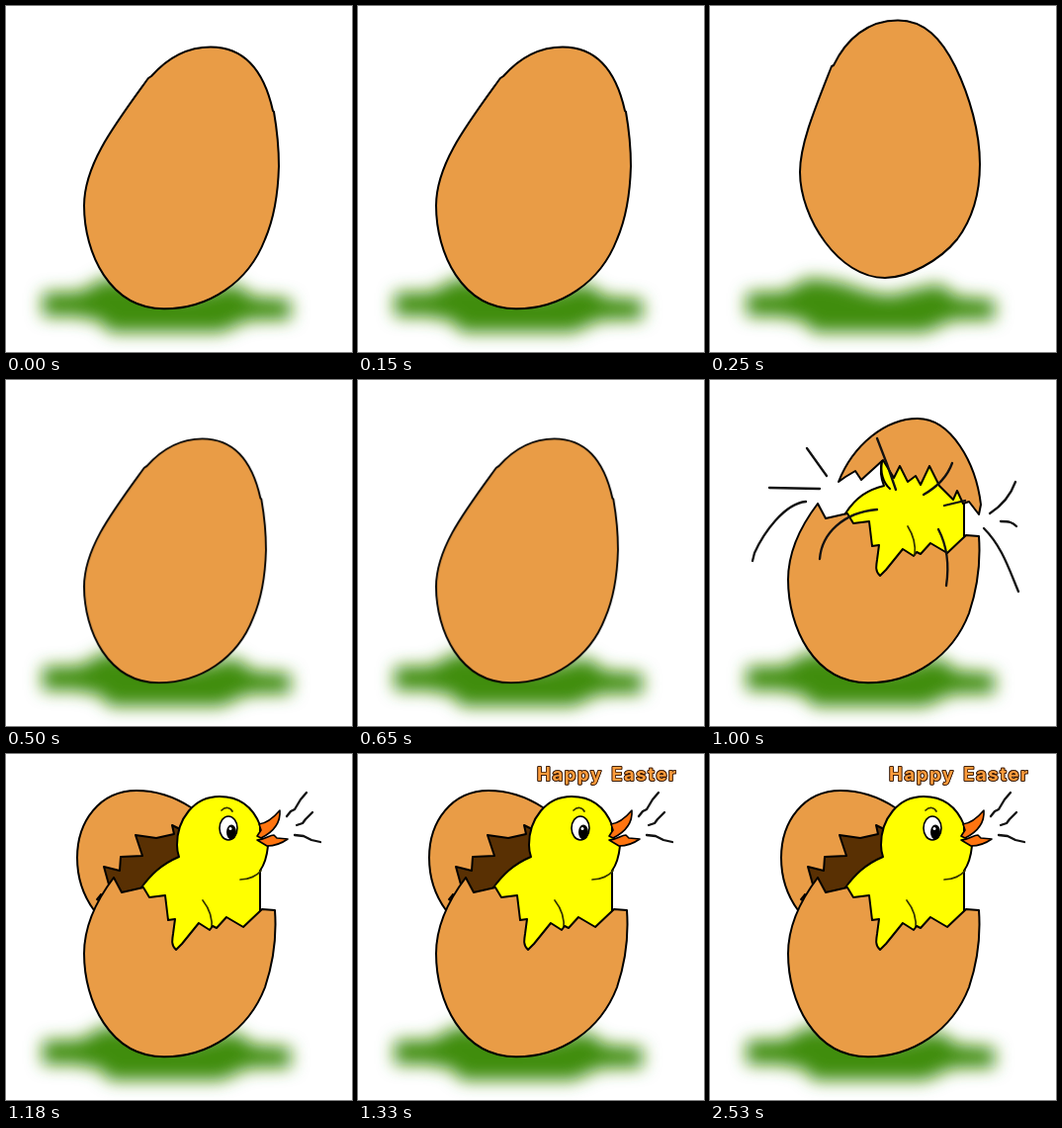
Write an HTML page without scripts that moves like this. It is 350 px wide and 350 px high and loops after 3330 ms.

```html
<!DOCTYPE html>
<html lang="en">
<head>
<meta charset="utf-8">
<title>Happy Easter</title>
<style>
  html, body { margin: 0; width: 100%; height: 100%; overflow: hidden; background: #fff; }
  svg { display: block; width: 100vw; height: 100vh; }

  .line, .shell, .chick, .beak, .inside {
    stroke: #000; stroke-width: 2; stroke-linecap: round; stroke-linejoin: round;
    vector-effect: non-scaling-stroke;
  }
  .line { fill: none; }
  .shell { fill: #e99c46; }
  .chick { fill: #ff0; }
  .beak { fill: #ff7410; stroke-width: 1.6; }
  .inside { fill: #593003; }
  .soft { stroke: #111; stroke-width: 2.3; }
  .thin { stroke: #333300; stroke-width: 1.7; }

  .title {
    font: 700 18.5px Inter, "Open Sans", sans-serif;
    letter-spacing: 1.6px; word-spacing: 2.5px;
    fill: #ff9c3c; stroke: #3a1800; stroke-width: 1.6; stroke-linejoin: round;
    paint-order: stroke; filter: drop-shadow(.8px .8px 0 #200c00);
  }

  /* Each layer switches on and off without fading. */
  .layer { opacity: 0; animation: 3330ms step-end infinite; }
  .rest { animation-name: rest; }
  .jump { animation-name: jump; }
  .squash { animation-name: squash; }
  .cracked { animation-name: cracked; }
  .burst { animation-name: burst; }
  .hatched { animation-name: hatched; }
  .greeting { animation-name: greeting; }

  @keyframes rest { 0%, 22.5225% { opacity: 1 } 7.5075%, 30.03%, 100% { opacity: 0 } }
  @keyframes jump { 0%, 15.015%, 100% { opacity: 0 } 7.5075% { opacity: 1 } }
  @keyframes squash { 0%, 22.5225%, 100% { opacity: 0 } 15.015% { opacity: 1 } }
  @keyframes cracked { 0% { opacity: 0 } 22.5225%, 100% { opacity: 1 } }
  @keyframes burst { 0%, 35.4354%, 100% { opacity: 0 } 30.03% { opacity: 1 } }
  @keyframes hatched { 0% { opacity: 0 } 35.4354%, 100% { opacity: 1 } }
  @keyframes greeting { 0% { opacity: 0 } 39.9399%, 100% { opacity: 1 } }
</style>
</head>
<body>
<svg viewBox="0 0 350 350">
  <defs>
    <filter id="blur" x="-20%" y="-80%" width="140%" height="260%">
      <feGaussianBlur stdDeviation="8.5"/>
    </filter>
    <path id="egg" d="M147 71C163 53 183 41.500 207 41.500C245 41.500 262 70 270 106L271 107
      C275 130 276 150 276 162C275 200 268 222 262 236C245 280 205 306.300 160 306.300
      C105 306.300 79 250 79 202C79 160 110 120 144 73Z"/>
  </defs>

  <path filter="url(#blur)" fill="#3f8d08" d="M37 290L75 289L100 275L130 279L160 289L182 293
    L205 287L232 281L250 294L288 297L288 317L245 318L218 330L105 330L95 319L70 314L37 314Z"/>

  <!-- whole egg -->
  <use href="#egg" class="layer rest shell"/>
  <path class="layer jump shell" d="M125 60C138 33 160 14.500 190 14.500C217 14.500 234 33 248 61
    C263 92 273 128 273 160C273 190 265 216 250 236C232 258 200 275 177 275
    C130 275 91 214 91 168C91 140 106 104 123 61Z"/>
  <use href="#egg" class="layer squash shell"
    transform="translate(79 306) scale(.934 .932) translate(-79 -306)"/>

  <!-- lid flies up -->
  <g class="layer burst">
    <path class="chick" d="M137 135C148 118 160 111 176 107C172 98 172 90 174 80L200 70
      L257 105V165L240 185L195 190L170 205Z"/>
    <path class="shell" d="M130 103C145 65 178 39 210 39C244 39 269 84 274 126L272 136L262 123
      L256 125L250 112L246 121L232 107L222 87L213 106L208 97L200 103L192 87L186 99L175 81
      L153 101L147 92L137 98Z"/>
    <path class="line" d="M174 82C172 93 175 104 182 110"/>
  </g>

  <!-- lid behind the chick -->
  <g class="layer hatched">
    <path class="shell" d="M187 54C170 43 152 37 132 37C95 37 72 68 72 105C72 127 78 143 89 158
      L150 150L190 90Z"/>
    <path class="inside" d="M99 114L115 118L116 104L138 103L131 82L152 85L170 81L168 72L180 78
      L178 112L138 140L117 146L104 132Z"/>
    <path class="inside" d="M92 147L96 142L95 149Z"/>
    <path class="chick" d="M257 72C249 52 235 43 216 43C190 43 173 66 173 92C173 97 174 101 175 104
      C156 112 146 123 137 135L170 205L195 190L240 185L257 165V118C262 111 264 103 265 93L257 82Z"/>
    <path class="beak" d="M254 87C262 87 266 82 271 82L274 85L285 86C278 91 271 93 264 93Z"/>
    <path class="beak" d="M256 71C264 70 271 64 277 57C278 70 270 79 258 85L254 83L258 77Z"/>
    <ellipse class="line" cx="225" cy="75" rx="9" ry="12" style="fill:#fff;stroke-width:1.6"/>
    <ellipse cx="228" cy="79" rx="5" ry="7.500"/>
    <circle cx="227" cy="75.500" r="1.500" fill="#fff"/>
    <path class="line thin" d="M218 57C222 53 227 54 229 58M237 127C246 127 254 123 258 118"/>
    <path class="line thin" d="M199 148C207 158 209 169 208 178"/>
    <path class="line soft" d="M284 63L288 58L292 56L298 46L304 39M294 72L300 70L303 66L310 59
      M292 82L301 83L309 87L318 89"/>
  </g>

  <path class="layer cracked shell" d="M109 125C90 150 79 176 79 202C79 250 105 306.300 160 306.300
    C205 306.300 245 280 262 236C270 212 274 185 272 158L259 157L240 175L223 165L213 176L209 174
    L206 178L195 171L178 192L172 198C167 194 168 188 169 182L171 167L164 168L161 143L145 145
    L139 135L117 140Z"/>

  <g class="layer burst">
    <path class="line soft" d="M98 69L118 97M60 109L111 110M43 183L45 175C54 155 75 125 97 123
      M283 135C297 126 305 114 309 103M294 143C303 143 306 144 310 148
      M277 150C295 168 302 190 312 214"/>
    <path class="line soft" d="M169 59L179 85L188 111M245 84C240 98 230 108 216 116
      M111 181C113 155 135 134 169 131M237 127L258 122M231 151C241 170 242 188 239 208"/>
    <path class="line thin" d="M200 148C207 159 208 169 207 177"/>
  </g>

  <text class="layer greeting title" x="181" y="27">Happy Easter</text>
</svg>
</body>
</html>
```
